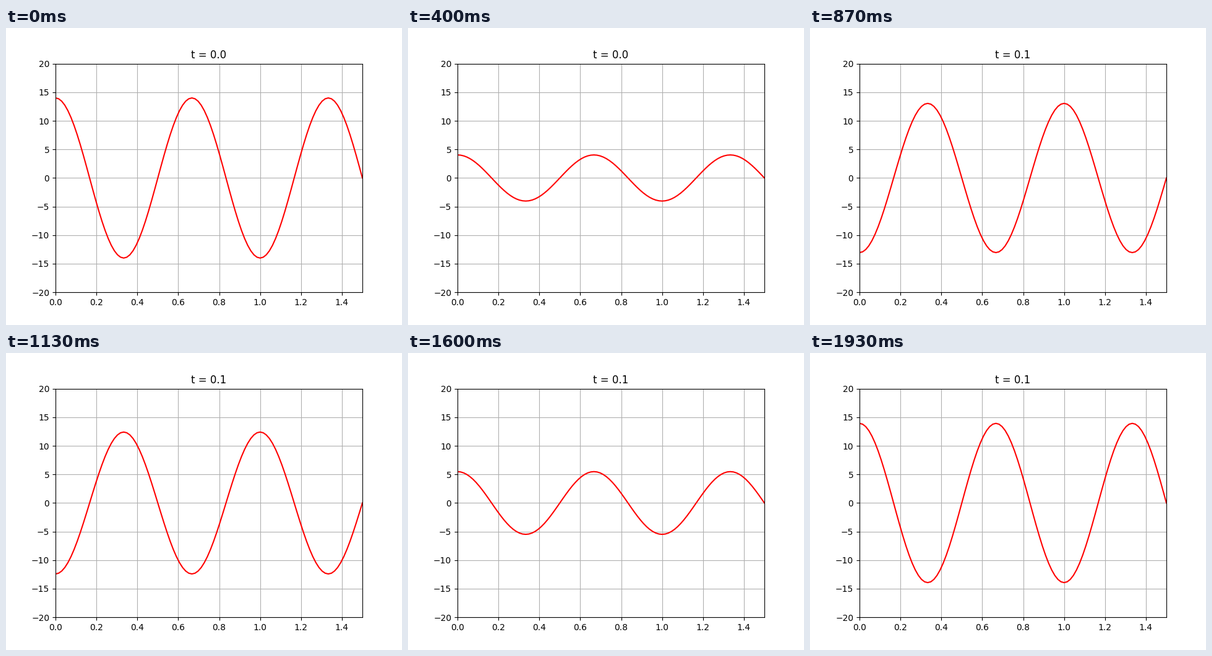
These frames come from a looping animation (640x480 px, 1.99 s). A matplotlib script:

```python
import numpy as np
import matplotlib.pyplot as plt
from matplotlib.animation import FuncAnimation

LOOP_MS = 1990
FRAMES = 30
AMPLITUDE = 14
WAVELENGTH = 2 / 3
FREQUENCY = 6.75
DT = 1 / 199

x = np.linspace(0, 1.5, 100)
shape = AMPLITUDE * np.cos(2 * np.pi * x / WAVELENGTH)

fig, ax = plt.subplots(figsize=(6.4, 4.8), dpi=100)
ax.set_xlim(0, 1.5)
ax.set_ylim(-20, 20)
ax.grid(True)
line, = ax.plot(x, shape, "r")
title = ax.set_title("t = 0.0")


def update(i):
    """Standing wave: a fixed shape scaled by a cosine in time."""
    t = i * DT
    line.set_ydata(shape * np.cos(2 * np.pi * FREQUENCY * t))
    title.set_text(f"t = {t:.1f}")
    return line, title


anim = FuncAnimation(fig, update, frames=FRAMES, interval=LOOP_MS / FRAMES,
                     repeat=True, repeat_delay=0)
plt.show()
```
